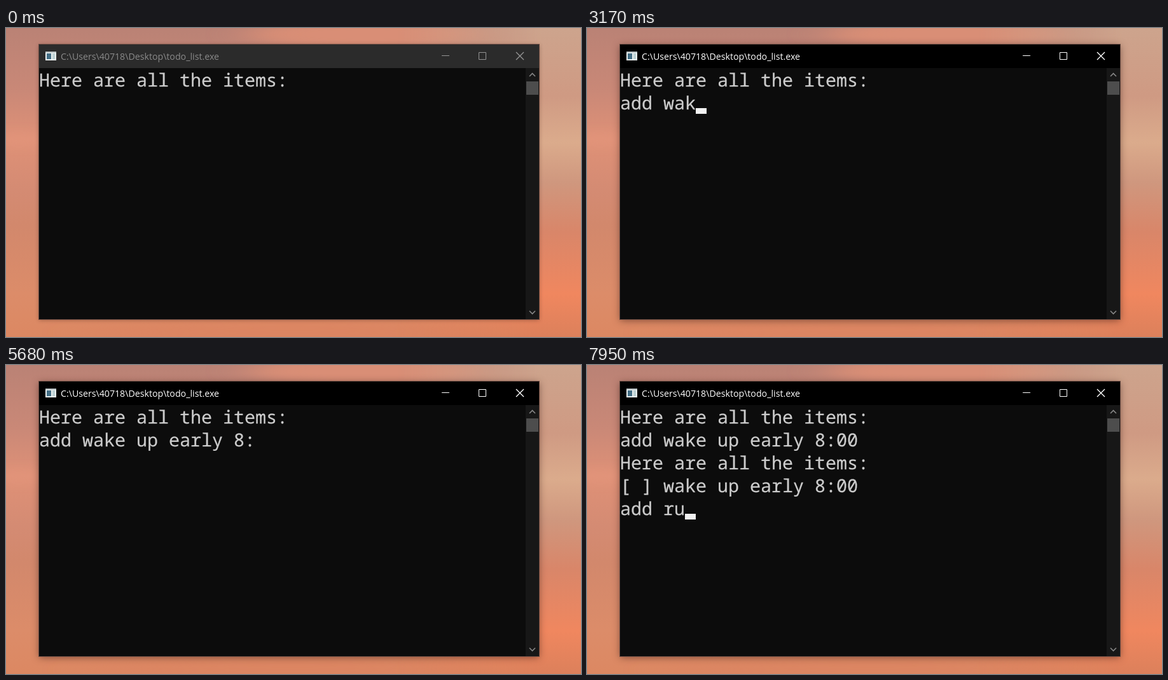
An HTML page that plays this animation: 904 px wide and 486 px high, repeating every 8 s.

```html
<!DOCTYPE html>
<html lang="en">
<head>
<meta charset="utf-8">
<title>Todo list console</title>
<style>
  html, body { margin: 0; height: 100%; overflow: hidden; background: #d98a6c; }
  svg { display: block; width: 100vw; height: 100vh; }
  #frame { fill: #0c0c0c; filter: drop-shadow(0 2px 6px rgba(40, 12, 8, .5)); }
  #bar { fill: #000; }
  #caption { font: 14.18px "Open Sans", "Noto Sans", sans-serif; fill: #fff; }
  #buttons { fill: none; stroke: #fff; }
  .inactive #frame { filter: drop-shadow(0 1px 3px rgba(40, 12, 8, .4)); }
  .inactive #bar { fill: #2b2b2b; }
  .inactive #caption { fill: #8a8a8a; }
  .inactive #buttons { stroke: #949494; }
  #console text {
    font: 28.333px "Noto Sans Mono", "DejaVu Sans Mono", monospace;
    fill: #ccc; stroke: #ccc; stroke-width: .25;
    white-space: pre; text-rendering: geometricPrecision;
  }
</style>
</head>
<body>
<svg id="stage" viewBox="0 0 904 486" preserveAspectRatio="none">
  <defs>
    <linearGradient id="skyLeft" x2="0" y2="1">
      <stop offset="0" stop-color="#ba8275"/>
      <stop offset=".2" stop-color="#c98877"/>
      <stop offset=".36" stop-color="#df9177"/>
      <stop offset=".52" stop-color="#d48b73"/>
      <stop offset=".64" stop-color="#d2886c"/>
      <stop offset=".86" stop-color="#dc8c69"/>
      <stop offset="1" stop-color="#dc8862"/>
    </linearGradient>
    <linearGradient id="skyRight" x2="0" y2="1">
      <stop offset="0" stop-color="#cda48d"/>
      <stop offset=".22" stop-color="#cf9a83"/>
      <stop offset=".37" stop-color="#dbab8c"/>
      <stop offset=".5" stop-color="#cf977e"/>
      <stop offset=".66" stop-color="#d98669"/>
      <stop offset=".86" stop-color="#f0875f"/>
      <stop offset="1" stop-color="#dc805b"/>
    </linearGradient>
    <linearGradient id="fade">
      <stop offset=".68" stop-color="#000"/>
      <stop offset=".93" stop-color="#fff"/>
    </linearGradient>
    <mask id="rightSide"><rect width="904" height="486" fill="url(#fade)"/></mask>
    <filter id="soft" x="-50%" y="-100%" width="200%" height="300%">
      <feGaussianBlur stdDeviation="30 8"/>
    </filter>
  </defs>

  <rect width="904" height="486" fill="url(#skyLeft)"/>
  <g filter="url(#soft)">
    <ellipse cx="570" cy="10" rx="190" ry="24" fill="#d98e76"/>
    <ellipse cx="20" cy="175" rx="60" ry="9" fill="#e2947a"/>
    <ellipse cx="450" cy="480" rx="330" ry="16" fill="#dc8562"/>
  </g>
  <rect width="904" height="486" fill="url(#skyRight)" mask="url(#rightSide)"/>

  <rect id="frame" x="52" y="26" width="786" height="432"/>
  <rect x="51.5" y="25.5" width="787" height="433" fill="none" stroke="#6a4c43"/>
  <rect id="bar" x="52" y="26" width="786" height="37"/>
  <g>
    <rect x="62" y="37" width="17" height="14" fill="#e8eeee"/>
    <rect x="62" y="37" width="17" height="2" fill="#b9c2c4"/>
    <rect x="64" y="40" width="7" height="9" fill="#446f86"/>
    <rect x="73" y="40" width="4" height="9" fill="#bdd2d4"/>
  </g>
  <text id="caption" x="86" y="50">C:\Users\40718\Desktop\todo_list.exe</text>
  <g id="buttons">
    <path d="M685 43.5h12 M743.5 38.5h11v11h-11z"/>
    <path d="M802 38l12 12m0-12l-12 12" stroke-width="1.4"/>
  </g>

  <rect x="817" y="63" width="21" height="395" fill="#171717"/>
  <rect x="818" y="84" width="19" height="21" fill="#4d4d4d"/>
  <path d="M823 76l4.5-4.5 4.5 4.5 M823 445l4.5 4.5 4.5-4.5" fill="none" stroke="#868686" stroke-width="1.6"/>

  <g id="console">
    <text x="52" y="92"></text>
    <text x="52" y="128"></text>
    <text x="52" y="164"></text>
    <text x="52" y="200"></text>
    <text x="52" y="236"></text>
    <rect id="cursor" width="17" height="9" fill="#f2f2f2"/>
  </g>
</svg>
<script>
const LOOP = 8000, FOCUS_AT = 930;
const CELL = 17, LINE = 36;
const HEADING = "Here are all the items:\n";
const BLINK = "";

// Typed text shows the cursor; a blink hides it until the next key.
const events = [
  [1380, "a"], [1480, BLINK], [1740, "d"], [1840, "d"], [1990, BLINK],
  [2350, " "], [2520, BLINK],
  [2870, "w"], [2960, "a"], [3050, BLINK], [3170, "k"], [3270, "e"], [3320, " "],
  [3480, "u"], [3530, "p"], [3580, BLINK], [3610, " "],
  [3780, "e"], [3870, "a"], [4000, "r"], [4100, BLINK], [4150, "l"], [4230, "y"], [4360, " "],
  [4620, "8"], [5170, BLINK], [5350, ":"], [5680, BLINK], [5910, "0"], [6030, "0"],
  [6190, BLINK], [6260, "\n" + HEADING + "[ ] wake up early 8:00\n"],
  [7250, "a"], [7280, BLINK], [7480, "d"], [7570, "d"], [7690, " "],
  [7790, BLINK], [7870, "r"], [7950, "u"]
];

const stage = document.getElementById("stage");
const cursor = document.getElementById("cursor");
const rows = document.querySelectorAll("#console text");

function render(time) {
  const past = events.filter(([at]) => at <= time);
  const lines = (HEADING + past.map(([, text]) => text).join("")).split("\n");
  const row = lines.length - 1;
  const cursorOn = past.length > 0 && past[past.length - 1][1] !== BLINK;

  stage.classList.toggle("inactive", time < FOCUS_AT);
  rows.forEach((element, i) => { element.textContent = lines[i] || ""; });
  cursor.setAttribute("x", 52 + CELL * lines[row].length);
  cursor.setAttribute("y", 90 + LINE * row);
  cursor.setAttribute("visibility", cursorOn ? "visible" : "hidden");
}

function tick() {
  render(performance.now() % LOOP);
  requestAnimationFrame(tick);
}
tick();
</script>
</body>
</html>
```
